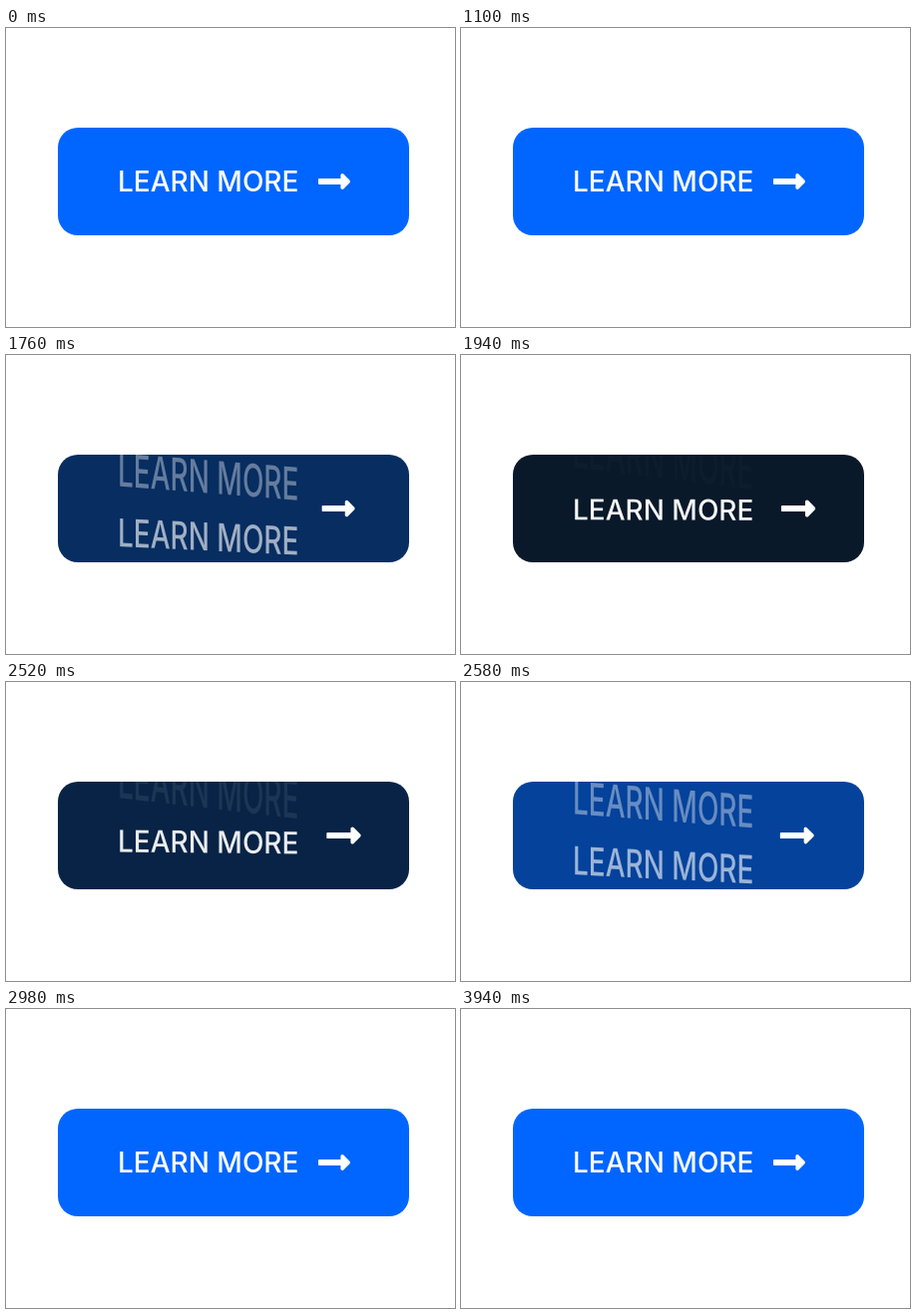
Animation of 450 by 300 pixels, one loop 4180 ms. Source, as an HTML page:

```html
<!DOCTYPE html>
<html lang="en">
<head>
<meta charset="utf-8">
<title>Learn more button</title>
<style>
  @property --text { syntax: "<number>"; inherits: true; initial-value: 0; }
  @property --arrow { syntax: "<number>"; inherits: true; initial-value: 0; }

  html, body {
    margin: 0;
    width: 100%;
    height: 100%;
    overflow: hidden;
    background: #fff;
  }

  .button {
    position: absolute;
    left: 52px;
    top: 100px;
    width: 352px;
    height: 108px;
    border-radius: 20px;
    overflow: hidden;
    color: #fff;
    background: #06f;
    animation: 4180ms infinite;
    animation-name: fill, text, arrow;
  }

  .label {
    position: absolute;
    left: 60px;
    top: 34px;
    width: 181px;
    text-align: center;
    font: 500 28px/40px Inter, sans-serif;
    white-space: nowrap;
    /* --away: 0 at rest, 1 fully out of view */
    opacity: calc(1 - var(--away));
    transform:
      translateY(calc(var(--away) * var(--travel)))
      skewY(calc(var(--away) * 7.3deg))
      scaleY(calc(1 + var(--away)));
  }
  .first { --away: var(--text); --travel: -51px; }
  .second { --away: calc(1 - var(--text)); --travel: 75px; }

  .arrow {
    position: absolute;
    left: 261px;
    top: 45.5px;
    width: 32px;
    height: 16px;
    overflow: visible;
    fill: #fff;
    transform:
      translateX(calc(var(--arrow) * 10px))
      scale(calc(1 + var(--arrow) * .08));
  }

  /* The way back starts with a small jump, then eases out. */
  @keyframes fill {
    0% { background: #06f; }
    38.038% { background: #06f; animation-timing-function: cubic-bezier(.4, 0, .2, 1); }
    46.651%, 60.287% { background: #09192a; }
    60.288% { background: #082344; animation-timing-function: cubic-bezier(.206, .305, .226, 1); }
    67.225%, 100% { background: #06f; }
  }
  @keyframes text {
    0% { --text: 0; }
    38.038% { --text: 0; animation-timing-function: cubic-bezier(.4, 0, .2, 1); }
    48.182%, 60.287% { --text: 1; }
    60.288% { --text: .915; animation-timing-function: cubic-bezier(.232, .265, .212, 1); }
    68.756%, 100% { --text: 0; }
  }
  @keyframes arrow {
    0% { --arrow: 0; }
    38.038% { --arrow: 0; animation-timing-function: cubic-bezier(.4, 0, .2, 1); }
    50.957%, 60.287% { --arrow: 1; }
    60.288% { --arrow: .954; animation-timing-function: cubic-bezier(.271, .206, .201, 1); }
    71.531%, 100% { --arrow: 0; }
  }
</style>
</head>
<body>
  <div class="button">
    <span class="label first">LEARN MORE</span>
    <span class="label second" aria-hidden="true">LEARN MORE</span>
    <svg class="arrow" viewBox="0 0 32 16" aria-hidden="true">
      <path d="M22.4 5.1H.9Q0 5.1 0 6V10Q0 10.9 .9 10.9H22.4V14.2C22.4 15.7 24.3 16.5 25.3 15.4L31.5 9.2Q32.5 8 31.5 6.8L25.3 .6C24.3 -.5 22.4 .3 22.4 1.8Z"/>
    </svg>
  </div>
</body>
</html>
```
